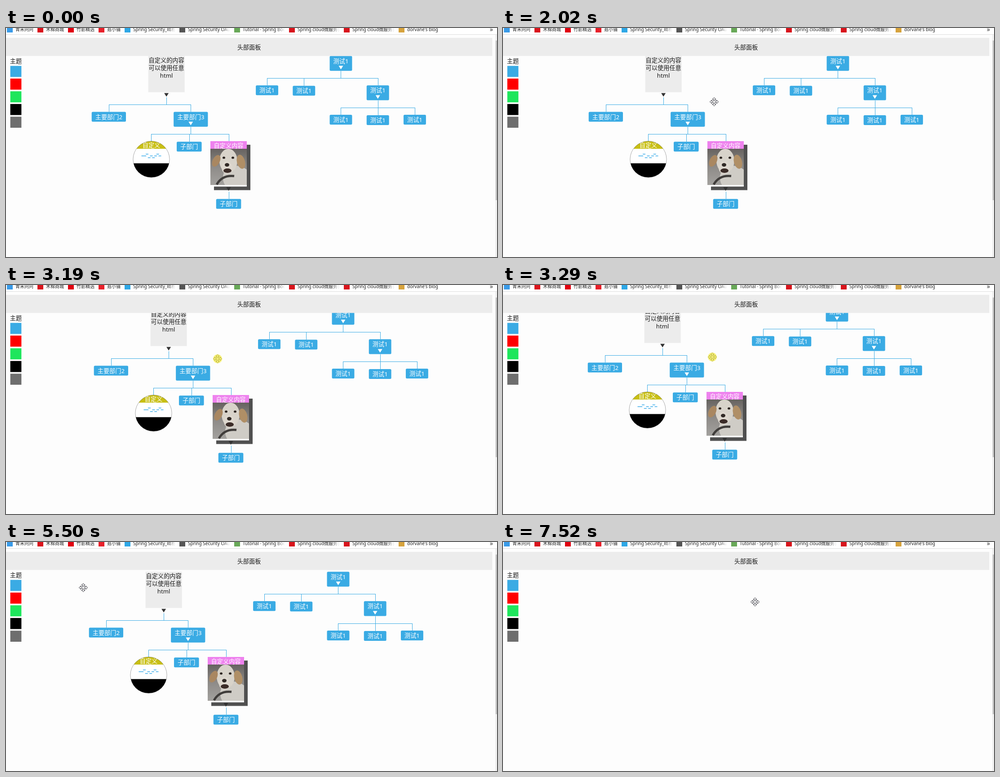
Recreate the animation shown at these times as an HTML page with a canvas. Size 1093 by 512 pixels, loop 8 s.

```html
<!DOCTYPE html>
<html lang="zh-CN">
<head>
<meta charset="utf-8">
<title>组织结构图</title>
<style>
html, body { margin: 0; width: 100%; height: 100%; overflow: hidden; background: #fdfdfd; }
canvas { display: block; width: 100%; height: 100%; }
</style>
</head>
<body>
<canvas id="stage" width="1093" height="512"></canvas>
<script>
const ctx = document.getElementById('stage').getContext('2d');
const LOOP = 8000;
const BLUE = '#3aabe4', PANEL = '#ececec', INK = '#1a1a1a';
const FAMILY = '"Noto Sans", "Noto Sans CJK SC", "Noto Sans CJK", sans-serif';
const TREE_TOP = 62.5, LEVEL_GAP = 32.5, STEM = 16;

// Glides: from, until, x, y. The point rests between them.
const POINTER = [
  [220, 720, 735, 420], [900, 1080, 642, 264], [1080, 1540, 447, 147],
  [1770, 2360, 501, 189], [2540, 3290, 466, 161], [3600, 3950, 462, 179],
  [3980, 4370, 188, 69], [4420, 4650, 158, 100], [5310, 5730, 188, 105],
  [5880, 6350, 394, 158], [6630, 6950, 384, 166], [7150, 7520, 561, 134]
];
const DRAG = [[2540, 2540, 54, 42], [2540, 3290, -2, -14], [3600, 3950, -6, 4]];
const PRESSED = 2300, RELEASED = 4000, CLEARED = 7340;

const clamp = v => Math.min(1, Math.max(0, v));

function glide(legs, t, x, y) {
  for (const [from, until, toX, toY] of legs) {
    if (t < from) break;
    const k = clamp((t - from) / (until - from || 1) + (until === from));
    x += (toX - x) * k;
    y += (toY - y) * k;
  }
  return [Math.round(x), Math.round(y)];
}

function rect(x, y, w, h, color) {
  ctx.fillStyle = color;
  ctx.fillRect(x, y, w, h);
}

function oval(x, y, rx, ry, color, turn = 0) {
  ctx.fillStyle = color;
  ctx.beginPath();
  ctx.ellipse(x, y, rx, ry, turn, 0, Math.PI * 2);
  ctx.fill();
}

function setFont(size) {
  ctx.font = `${size}px ${FAMILY}`;
}

function text(str, x, cy, color = INK, align = 'center', size = 13.2) {
  setFont(size);
  ctx.textAlign = align;
  ctx.fillStyle = color;
  ctx.fillText(str, x, cy + size * 0.38);
}

function textWidth(str, size = 13.2) {
  setFont(size);
  return ctx.measureText(str).width;
}

function arrow(x, y, color) {
  ctx.fillStyle = color;
  ctx.beginPath();
  ctx.moveTo(x - 5, y);
  ctx.lineTo(x + 5, y);
  ctx.lineTo(x, y + 8);
  ctx.fill();
}

function drawLabel({ label, w, h, x, y, kids }) {
  ctx.fillStyle = BLUE;
  ctx.beginPath();
  ctx.roundRect(x - w / 2, y, w, h, 2.5);
  ctx.fill();
  text(label, x, y + 11, '#fff');
  if (kids.length) arrow(x, y + 22, '#fff');
}

function drawPanel({ x, y }) {
  rect(x - 40.5, y, 81, 81, PANEL);
  ['自定义的内容', '可以使用任意', 'html']
    .forEach((line, i) => text(line, x, y + 9.5 + i * 16.8));
  arrow(x, y + 83, '#333');
}

function drawBadge({ x, y }, shift) {
  const left = x - 41;
  ctx.save();
  ctx.beginPath();
  ctx.arc(x, y + 40.5, 40.6, 0, Math.PI * 2);
  ctx.clip();
  rect(left, y, 82, 17, '#c8bf14');
  rect(left, y + 17, 82, 33, '#fff');
  rect(left, y + 49.5, 82, 33, '#000');
  [...'110212101'].forEach((row, i) =>
    rect(left + 19 - shift + i * 4.75, y + 28 + row * 4, 6, 2, '#6bc0ee'));
  ctx.restore();
  ctx.strokeStyle = 'rgba(40,40,40,.5)';
  ctx.lineWidth = 0.8;
  ctx.stroke();
  text('自定义', x, y + 9, '#fff');
}

function drawPhoto(x, y) {
  ctx.save();
  ctx.translate(x, y);
  ctx.beginPath();
  ctx.rect(0, 0, 81, 81);
  ctx.clip();
  const wall = ctx.createLinearGradient(0, 0, 0, 81);
  wall.addColorStop(0, '#66625f');
  wall.addColorStop(0.5, '#8e8b88');
  wall.addColorStop(1, '#a3a19e');
  rect(0, 0, 81, 81, wall);
  oval(62, 70, 36, 30, '#cfccc6', 0.6);
  oval(40, 27, 20, 27, '#d8d3ca');
  oval(37, 42, 12, 14, '#ddd7ce');
  oval(13, 27, 8, 14, '#a98761', 0.45);
  oval(68, 29, 9, 16, '#b08f66', -0.25);
  [30, 50].forEach(eye => oval(eye, 20, 3, 2.5, '#2c2521'));
  oval(37, 36, 5, 4, '#302925');
  oval(38, 49, 9, 5, '#3b2c28');
  ctx.strokeStyle = '#403d3b';
  ctx.lineWidth = 5;
  ctx.beginPath();
  ctx.moveTo(14, 80);
  ctx.quadraticCurveTo(26, 58, 53, 61);
  ctx.stroke();
  ctx.restore();
}

function drawCard({ x, y }) {
  const left = Math.round(x - 40.5);
  rect(left + 8, y + 8, 81, 101.5, '#505050');
  rect(left, y, 81, 101.5, '#fff');
  rect(left, y, 81, 17.5, '#ee82ee');
  text('自定义内容', x, y + 9.5, '#fff');
  drawPhoto(left, y + 17);
  arrow(x, y + 103, '#333');
}

const label = (str, ...kids) =>
  ({ draw: drawLabel, label: str, w: textWidth(str) + 16, h: kids.length ? 33.3 : 22, kids });
const custom = (draw, w, h, ...kids) => ({ draw, w, h, kids });

// A parent sits centred over the row of its children.
function measure(node, gap) {
  node.kids.forEach(kid => measure(kid, gap));
  node.row = node.kids.reduce((sum, kid) => sum + kid.span + gap, -gap);
  node.span = Math.max(node.w, node.row);
}

function place(node, left, y, gap) {
  node.x = left + node.span / 2;
  node.y = node.draw === drawLabel ? y : Math.round(y * 2 - 0.3) / 2;
  const count = node.kids.length;
  let kidLeft = node.x - node.row / 2;
  node.kids.forEach((kid, i) => {
    const inner = i > 0 && i < count - 1 ? 1 : 0;
    place(kid, kidLeft, y + node.h + (count > 1 ? LEVEL_GAP : STEM) + inner, gap);
    kidLeft += kid.span + gap;
  });
}

function layout(root, left, gap, nudge = 0) {
  measure(root, gap);
  place(root, left, TREE_TOP, gap);
  root.x += nudge;
  return root;
}

function drawTree(node, shift) {
  const { kids, x, y, h } = node;
  if (kids.length) {
    const bar = Math.round(y + h + STEM), top = Math.round(y + h);
    const xs = kids.map(kid => Math.round(kid.x));
    rect(Math.round(x), top, 1, bar - top, BLUE);
    if (kids.length > 1) {
      rect(xs[0], bar, xs[xs.length - 1] - xs[0] + 1, 1, BLUE);
      kids.forEach((kid, i) => rect(xs[i], bar, 1, kid.y - bar, BLUE));
    }
  }
  node.draw(node, shift);
  kids.forEach(kid => drawTree(kid, shift));
}

const test = (...kids) => label('测试1', ...kids);
const trees = [
  layout(custom(drawPanel, 81, 92.5,
    label('主要部门2'),
    label('主要部门3',
      custom(drawBadge, 81, 81),
      label('子部门'),
      custom(drawCard, 88, 113, label('子部门')))), 190.7, 16, -8),
  layout(test(test(), test(), test(test(), test(), test())), 556.1, 32.3)
];

const BOOKMARKS = [
  ['青禾问问', '#3a9be8'],
  ['木棉商城', '#d9141c'],
  ['竹影精选', '#e00010'],
  ['逛小铺', '#e8202a'],
  ['Spring Security_晴格笔记', '#2ea7e6'],
  ['Spring Security OAuth2', '#555'],
  ['Tutorial · Spring Boot and', '#68a858'],
  ['Spring cloud微服务实战', '#d8141c'],
  ['Spring cloud微服务实战', '#d8141c'],
  ["dorvane's blog", '#d6a23c']
];

function drawBookmarks() {
  const most = 94;
  rect(0, 0, 1093, 14, '#fff');
  rect(0, 14, 1093, 1, '#dcdcdc');
  let x = 2;
  for (const [title, color] of BOOKMARKS) {
    const left = x + 19, width = Math.min(most, textWidth(title, 10));
    let ink = '#222';
    if (width === most) {
      ink = ctx.createLinearGradient(left + 76, 0, left + most, 0);
      ink.addColorStop(0, '#222');
      ink.addColorStop(1, 'rgba(34,34,34,0)');
    }
    rect(x, -3, 13, 13, color);
    text(title, left, 3.5, ink, 'left', 10);
    x = left + width + 9;
  }
  text('»', 1077, 3, '#333', 'left', 14);
}

function drawPage() {
  rect(0, 15, 1093, 7, '#fdfdfd');
  rect(0, 22, 1082.5, 40.5, PANEL);
  text('头部面板', 541, 43);
  text('主题', 22, 73.5);
  [BLUE, '#ff0000', '#1ee65c', '#000', '#6e6e6e']
    .forEach((color, i) => rect(9.6, 84.7 + i * 28.4, 24.7, 24.7, color));
  rect(1089, 15, 4, 497, '#f1f1f1');
  rect(1090, 28, 3, 357, '#c1c1c1');
  drawBookmarks();
}

function drawPointer(x, y, pressed) {
  ctx.save();
  ctx.translate(x, y);
  ctx.beginPath();
  for (let side = 0; side < 4; side++) {
    ctx.lineTo(-1.5, -1.5);
    ctx.lineTo(-1.5, -5.5);
    ctx.lineTo(-4, -5.5);
    ctx.lineTo(0, -9.5);
    ctx.lineTo(4, -5.5);
    ctx.lineTo(1.5, -5.5);
    ctx.rotate(Math.PI / 2);
  }
  ctx.closePath();
  ctx.fillStyle = '#fff';
  ctx.fill();
  ctx.strokeStyle = '#2a2a33';
  ctx.lineWidth = 1;
  ctx.stroke();
  if (pressed) oval(0, 0, 10, 10, 'rgba(245,235,55,.65)');
  ctx.restore();
}

function frame(now) {
  const t = now % LOOP;
  rect(0, 0, 1093, 512, '#fdfdfd');
  if (t < CLEARED) {
    const shift = 8 * Math.sin(Math.PI * clamp((t - 500) / 1160)) ** 2;
    ctx.save();
    ctx.translate(...glide(DRAG, t, 0, 0));
    trees.forEach(tree => drawTree(tree, shift));
    ctx.restore();
  }
  drawPage();
  if (t >= POINTER[0][0]) {
    drawPointer(...glide(POINTER, t, 995, 503), t >= PRESSED && t < RELEASED);
  }
  requestAnimationFrame(frame);
}
requestAnimationFrame(frame);
</script>
</body>
</html>
```
